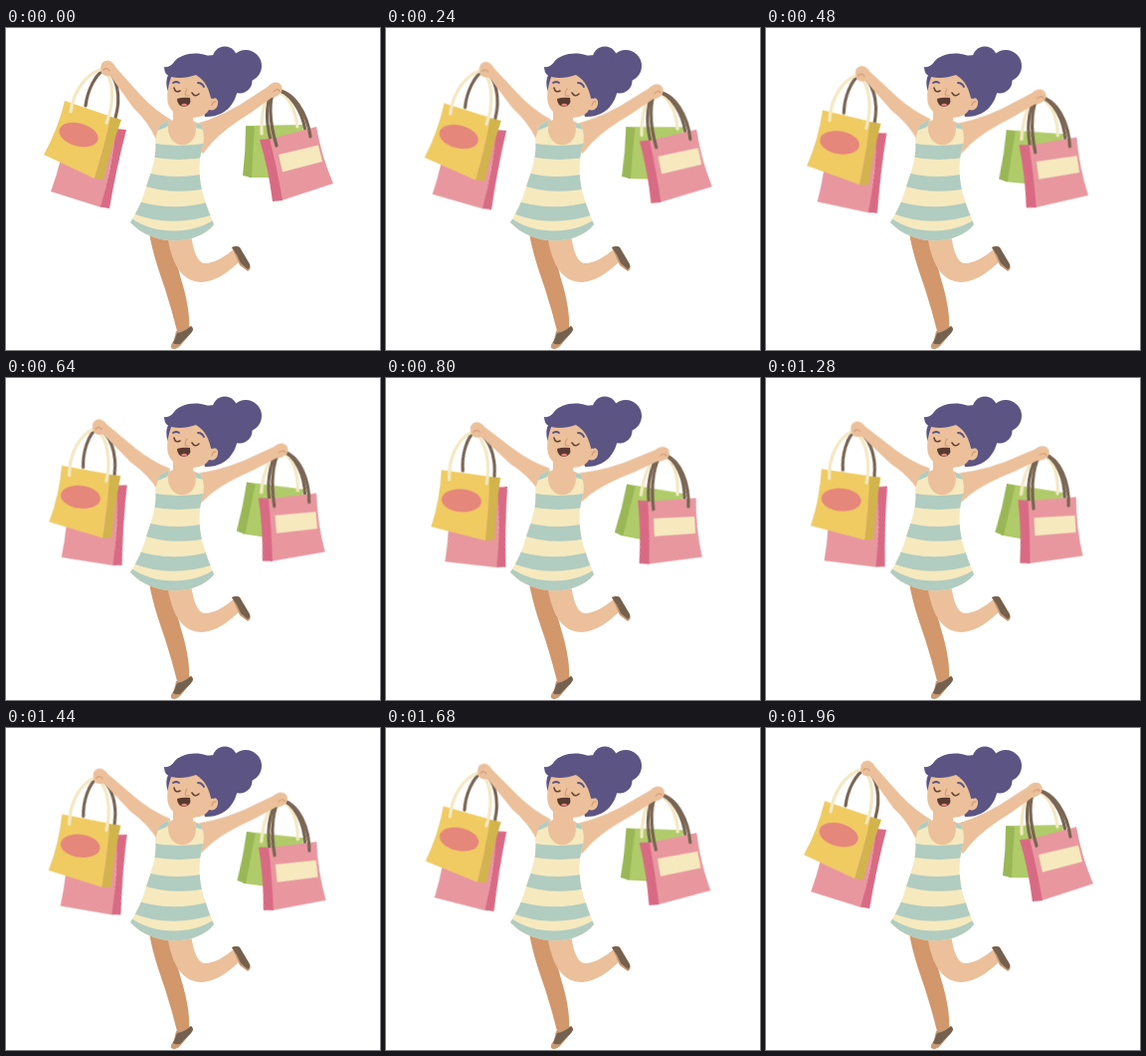
These frames come from a looping animation (376 px wide and 323 px high, 2000 ms). An HTML page:

```html
<!DOCTYPE html>
<html lang="en">
<head>
<meta charset="utf-8">
<title>Happy shopper</title>
<style>
  html, body { margin: 0; width: 100%; height: 100%; overflow: hidden; background: #fff; }
  svg { display: block; width: 100vw; height: 100vh; }

  .skin { fill: #ebc09b; }
  .tan { fill: #d2976a; }
  .hair { fill: #5c5483; }
  .cream { fill: #f6e9be; }
  .teal { fill: #b1ccc0; }
  .yellow { fill: #efcb62; }
  .mustard { fill: #d2b44c; }
  .coral { fill: #e5877b; }
  .pink { fill: #e8979f; }
  .rose { fill: #d96a84; }
  .green { fill: #b0cb69; }
  .moss { fill: #99b755; }
  .shoe { fill: #75614f; }
  .sole { fill: #c99a74; }
  .mouth { fill: #593a31; }

  .line { fill: none; stroke-linecap: round; stroke-linejoin: round; }
  .handle { stroke-width: 3.2; }
  .pale { stroke: #f4e8c4; }
  .brown { stroke: #796553; }
  .ink { stroke: #684334; stroke-width: 1.6; }
  .brow { stroke: #5c5483; stroke-width: 1.8; }
  .fold { stroke: #d29b75; stroke-width: 1.2; }

  /* Each arm carries its bags rigidly around the shoulder. */
  .arm {
    transform-box: view-box;
    animation: sway 1s cubic-bezier(.37, 0, .63, 1) -1.98s infinite alternate;
  }
  .left { transform-origin: 157px 100px; --turn: -12.4deg; }
  .right { transform-origin: 197px 108px; --turn: 12deg; }
  @keyframes sway {
    from { transform: rotate(0deg); }
    to { transform: rotate(var(--turn)); }
  }
</style>
</head>
<body>
<svg viewBox="0 0 376 323">
  <defs>
    <clipPath id="dress">
      <path d="M154 98 L164 92 C160 106 167 117 177 117.500 C188 117 193 106 190 95 L196 97
        C199 104 200 111 197 121 C193 136 194 155 199 170 Q203 183 209 197
        C193 218 148 220 125 195 Q136 178 141 159 C148 139 152 125 150 112 Z"/>
    </clipPath>
  </defs>

  <!-- legs -->
  <path class="tan" d="M144 206 C148 228 154 244 160 262 Q167 284 172 304 L184 301
    C185 286 181 268 176 252 C172 238 169 224 168 208 Z"/>
  <path class="sole" d="M171 304 L186 299 Q189 302 186 306 L175 319 Q170 324 166 321 Q165 318 169 313 Z"/>
  <path class="shoe" d="M172 306 Q179 305 186 299 Q190 302 186 306 L175 317 Q170 318 168 316 Z"/>
  <path class="skin" d="M162 207 C166 235 176 255 197 255 C212 254 223 245 235 234 L229 222
    C220 229 210 236 200 236 C193 236 188 224 186 206 Z"/>
  <path class="sole" d="M227 220 L234 219 L245 237 Q247 242 243 244 L235 238 Z"/>
  <path class="shoe" d="M227 220 Q231 218 235 220 L245 237 Q246 241 243 242 L236 236 Q233 228 227 220 Z"/>

  <!-- left arm and bags -->
  <g class="arm left">
    <path class="pink" d="M62 94 L112 102 Q104 145 96 180 L45 164 Q57 132 62 94 Z"/>
    <path class="rose" d="M111 101 L121 102 Q111 140 104 181 L95 179.500 Q106 142 111 101 Z"/>
    <path class="line handle brown" d="M80 78 C82 62 90 46 100 41 C112 49 116 69 110 90"/>
    <path class="yellow" d="M59 73 L106 89 Q98 121 89 151 L38 127 Q52 102 59 73 Z"/>
    <path class="mustard" d="M105 89 L116 92 Q105 122 98 152 L89 151 Q99 122 105 89 Z"/>
    <ellipse class="coral" cx="73" cy="107" rx="20" ry="11.500" transform="rotate(15 73 107)"/>
    <path class="line handle pale" d="M65 84 C68 64 80 45 98 41 C110 53 108 78 101 95"/>
    <path class="skin" d="M96 45 C94 38 96 33 102 32.500 Q107 33 110 39 L135 67 Q150 83 166 92
      L164 112 L151 112 Q143 94 128 80 L105 48 Q99 49 96 45 Z"/>
    <path class="line fold" d="M98 42 Q102 39 104 43"/>
  </g>

  <!-- right arm and bags -->
  <g class="arm right">
    <path class="green" d="M242 98 L299 97 L294 150 L244 150 Z"/>
    <path class="moss" d="M241 98 L250 99 Q248 125 247 150 L238 148 Q241 123 241 98 Z"/>
    <path class="line handle pale" d="M257 106 C256 82 262 64 270 62 C284 66 291 82 293 99"/>
    <path class="line handle brown" d="M266 112 C260 90 262 69 270 62 C286 63 298 84 301 103"/>
    <path class="pink" d="M263 112 L312 99 Q317 128 329 156 L277 173 Q272 143 263 112 Z"/>
    <path class="rose" d="M255 112 L265 111 Q273 143 278 173 L268 174 Q264 142 255 112 Z"/>
    <path class="cream" d="M274 127 L314 117.500 L318 134 L278 144.500 Z"/>
    <path class="line handle brown" d="M272 118 C264 92 264 69 271 62 C290 63 303 87 306 109"/>
    <path class="skin" d="M192 96 Q222 87 249 68 L263 59 Q268 53 274 55 Q279 58 277 64
      Q274 69 267 70 L246 85 Q220 101 207 115 L198 126 L188 118 Z"/>
    <path class="line fold" d="M269 64 Q272 60 275 63"/>
  </g>

  <!-- neck and chest -->
  <path class="skin" d="M168 80 L188 84 L188 93 L196 97 L194 122 L156 122 L156 98 L168 92 Z"/>

  <!-- dress -->
  <g clip-path="url(#dress)">
    <path class="cream" d="M120 88 H215 V222 H120 Z"/>
    <g class="teal">
      <path d="M150 90 L168 90 L162 99 L150 104 Z"/>
      <path d="M188 92 L202 92 L202 103 L191 100 Z"/>
      <path d="M145 115 Q173 121 205 115 V129 Q173 135 145 129 Z"/>
      <path d="M135 143 Q168 154 205 145 V160 Q168 169 135 157 Z"/>
      <path d="M125 171 Q166 187 212 172 V186 Q166 202 125 185 Z"/>
      <path d="M120 186 C143 208 190 210 215 188 V222 H120 Z"/>
    </g>
  </g>

  <!-- head -->
  <g class="hair">
    <circle cx="220" cy="31" r="12.500"/>
    <circle cx="241" cy="38" r="16"/>
    <circle cx="235" cy="53" r="12.500"/>
    <path d="M195 30 C213 22 231 33 233 52 C235 70 224 90 200 89 L195 72 Z"/>
    <path d="M164 45 Q159 54 163 64 L170 48 Z"/>
  </g>
  <path class="skin" d="M167 47 C163 56 161 68 163 76 C166 86 177 91 188 90 C198 89 202 86 204 82
    C210 84 214 79 213 73 Q211 68 206 71 L205 45 Z"/>
  <path class="hair" d="M159 39 Q165 40 169 34 C177 24 199 22 211 33 C220 42 217 62 209 71
    L206 70 C204 62 201 53 191 47 C180 51 168 51 162 47 Q159 44 159 39 Z"/>
  <path class="line fold" d="M207 78 Q208 73 211 74"/>
  <path class="line ink" d="M169 60 Q170 65.500 175 63 M187 65 Q190 70 194 66"/>
  <path class="line brow" d="M168 55 Q171 53 174 55 M193 55 Q197 55 199 59"/>
  <path class="line fold" d="M182 61 Q179 66 181 68 L184 68"/>
  <path class="mouth" d="M172 71 Q178 69 185 70 Q187 78 179 79 Q172 78 172 71 Z"/>
  <path class="coral" d="M176 77 Q179 74.500 182.500 77 Q179 80 176 77 Z"/>
</svg>
</body>
</html>
```
